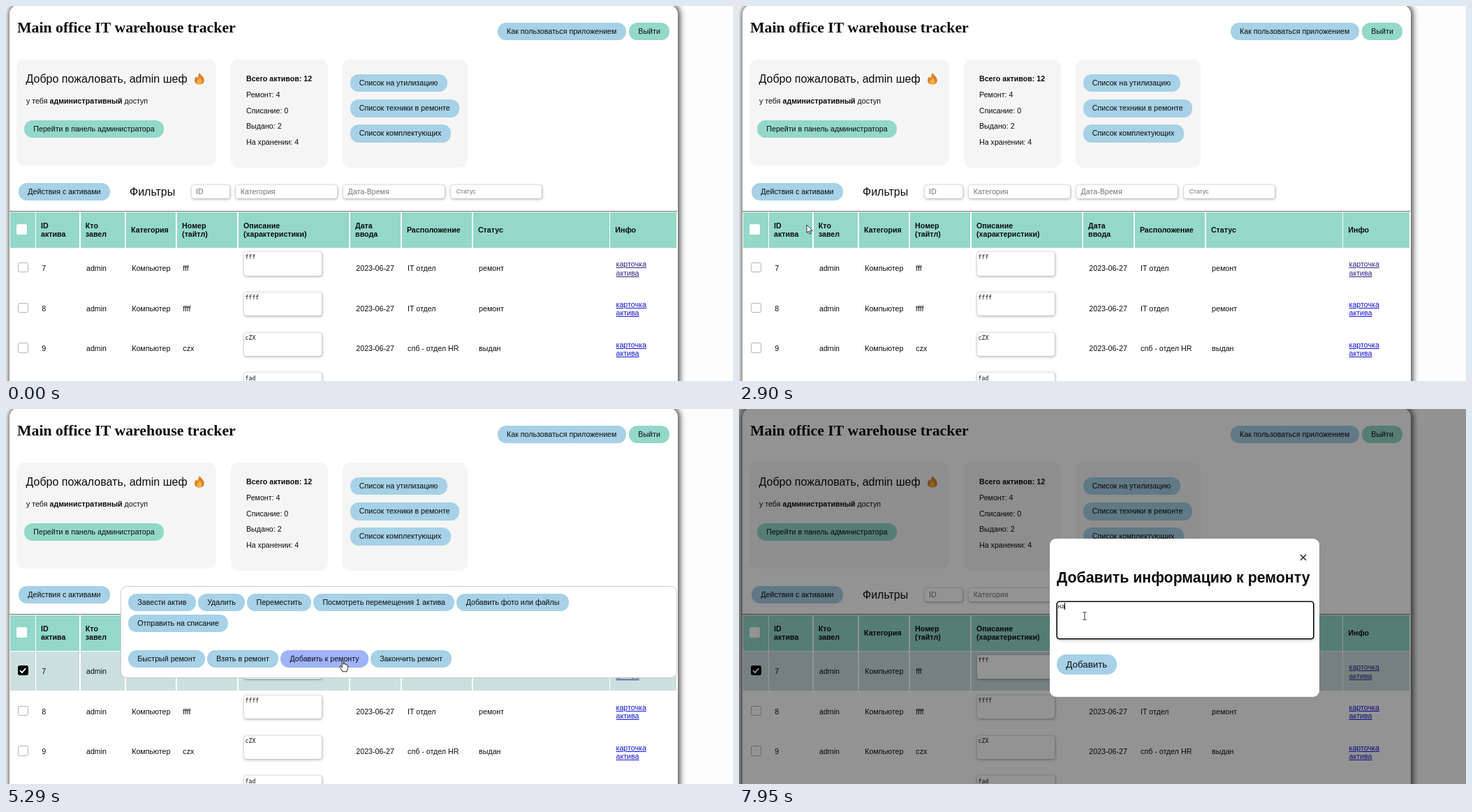
An HTML page for the animation above (8000 ms loop, 1041x538 px).

```html
<!DOCTYPE html>
<html lang="ru">
<head>
<meta charset="utf-8">
<title>Warehouse tracker</title>
<style>
  html, body { margin: 0; width: 100%; height: 100%; overflow: hidden; background: #fdfdfd; }
  #stage { position: absolute; left: 0; top: 0; width: 1041px; height: 538px; overflow: hidden;
    font: 10.67px "Liberation Sans", Arial, sans-serif; color: #0c0c0c; }
  #stage div, #stage svg { position: absolute; box-sizing: border-box; white-space: pre; }
  .t { line-height: 20px; }
  .big { font-size: 16px; }
  .bold { font-weight: bold; }
  .title { font: bold 21.8px/20px "Liberation Serif", serif; }
  .head { font-size: 21.33px; font-weight: bold; }
  .mono { font: 8.13px/20px "DejaVu Sans Mono", monospace; }
  .ph { color: #757575; }
  .small { font-size: 8.89px; }
  .link { color: #1414d8; text-decoration: underline; }
  .seen { color: #2b2a86; }
  .b { height: 25.4px; line-height: 25.4px; padding: 0 13.33px; border-radius: 12px; background: #a6d1e6; }
  .green { background: #93d8c8; }
  .wide { height: 29px; line-height: 29px; font-size: 13.33px; border-radius: 14px; }
  #stage .hot { background: #9fb2fa; }
  .page { background: #fff; border-radius: 14px; box-shadow: 1px 0 9px 2px rgba(0,0,0,.72); }
  .card { background: #f5f5f5; border-radius: 11px; }
  .field { background: #fff; border-radius: 3px; box-shadow: 0 0 1px rgba(0,0,0,.3), .5px 1px 4px rgba(0,0,0,.35); }
  .check { background: #fff; border: 1px solid #b4b4b4; border-radius: 2.5px; }
  .check svg { left: -1px; top: -1px; visibility: hidden; }
  .on .check { background: #000; border-color: #000; }
  .on .check svg { visibility: visible; }
  .row { left: 0; width: 960px; height: 57.7px; }
  .cell { background: transparent; }
  .hover .cell { background: #dde1e2; }
  .on .cell { background: #cbdfde; }
  .sel { background: #2a7fe0; color: #fff; }
  #tip { left: 626px; top: 346px; width: 162px; height: 20px; background: #f4f4f4;
    box-shadow: 0 0 1px #888, 0 1px 4px rgba(0,0,0,.4); font-size: 8.6px; }
  #tip .line { background: #cfcfcf; }
  #panel { left: 164px; top: 253.5px; width: 797px; height: 132.5px; background: #fff;
    border: 1px solid #ccc; border-radius: 9px; }
  #panel .line { left: 10px; display: flex; gap: 3px; }
  #panel .b { position: static; }
  #shade { left: 0; top: 0; width: 1041px; height: 538px; background: rgba(0,0,0,.425); }
  #modal { left: 444.5px; top: 186px; width: 386px; height: 226.5px; background: #fff; border-radius: 9px; }
  #note.focus { box-shadow: 0 0 0 1.6px #0c0c0c, .5px 2px 5px rgba(0,0,0,.35); }
  #caret { background: #000; }
</style>
</head>
<body>
<div id="stage"></div>
<script>
const LOOP = 8000, STEP = 72;
const stage = document.getElementById('stage');

const txt = (x, y, s, c = '') => `<div class="t ${c}" style="left:${x}px;top:${y - 10}px">${s}</div>`;
const btn = (x, y, s, c = '', id = '') => `<div class="b ${c}" id="${id}" style="left:${x}px;top:${y}px">${s}</div>`;
const box = (x, y, w, h, c, s = '', id = '') =>
  `<div class="${c}" id="${id}" style="left:${x}px;top:${y}px;width:${w}px;height:${h}px">${s}</div>`;
const lines = (x, y, s, c) => {
  const parts = s.split('|');
  return parts.map((p, i) => txt(x, y + (i - (parts.length - 1) / 2) * 12.3, p, c)).join('');
};

// Table geometry: left edge of each column, then the right edge of the table
const cols = [6, 42.8, 106.5, 171.7, 244.8, 332.7, 492.8, 566.6, 668.6, 865, 961.2];
const cells = (y, h, c) => cols.slice(0, -1).map((x, i) => box(x, y, cols[i + 1] - x - 1.3, h, c)).join('');
const heads = ['', 'ID|актива', 'Кто|завел', 'Категория', 'Номер|(тайтл)', 'Описание|(характеристики)',
  'Дата|ввода', 'Расположение', 'Статус', 'Инфо'];
const tick = '<svg width="14" height="14"><path d="M3 7.2 6 10.2 11.2 4.2" fill="none" stroke="#fff" stroke-width="1.8"/></svg>';
const rowTop = i => 347.9 + i * 57.7;

function row(i, id, name, note, place, state, seen = '') {
  const vals = ['', id, 'admin', 'Компьютер', name, '', '2023-06-27', place, state];
  return `<div class="row" id="row${i}" style="top:${rowTop(i)}px">` + cells(0, 56.5, 'cell') +
    box(17, 20, 14.5, 14.5, 'check', tick) +
    vals.map((v, k) => v && txt(cols[k] + 8.5, 28.2, v)).join('') +
    box(341, 5.3, 110.5, 33.5, 'field') + txt(342.6, 12.6, note, 'mono') +
    lines(873.5, 28.6, 'карточка|актива', 'link ' + seen) + '</div>';
}

const panelRow = (y, items) => `<div class="line" style="top:${y}px">` +
  items.map(s => `<div class="b"${s.endsWith('к ремонту') ? ' id="addFix"' : ''}>${s}</div>`).join('') + '</div>';

const flame = `<svg style="left:269px;top:96px" width="16" height="17">
  <path d="M8 0C10 3 15 6 14.8 11 14.6 15 11.5 16.5 7.7 16.5 3.5 16.5 1 14 1 10.5 1 8 2.5 6 3.6 5 3.8 6.5 4.5 7.2 5.3 7 6.8 5 6 2.5 8 0Z" fill="#d9822b"/>
  <path d="M8 6C9.5 8.5 12 10 11.5 13 11 15.5 9.5 16 7.7 16 5.5 16 4 14.5 4.2 12.5 4.5 10.5 7.5 9.5 8 6Z" fill="#f3b13c"/></svg>`;

const pointers = `
  <svg id="arrow" width="14" height="18" overflow="visible"><path d="M0 0V11.4L2.7 9 4.4 13 6.2 12.2 4.5 8.3H8.2Z" fill="#fff" stroke="#1b1b2b" stroke-width=".9"/></svg>
  <svg id="hand" width="14" height="18" overflow="visible"><path d="M-1 1C-1-.3 1-.3 1 1V5.6C2-.2 3.2 5 3.4 6 4.2 5 5.4 5.4 5.5 6.6 6.5 5.8 7.4 6.6 7.4 7.8V11C7.4 13 6 13.5 6 16H-.4C-.6 13.6-3 12-4.3 9.4-4.6 8-3.2 7.6-2.4 8.6L-1 10Z" fill="#fff" stroke="#111" stroke-width=".9"/></svg>
  <svg id="beam" width="14" height="18" overflow="visible"><path d="M-2.6-5.5H-.7L0-5 .7-5.5H2.6M0-5V5M-2.6 5.5H-.7L0 5 .7 5.5H2.6" fill="none" stroke="#333" stroke-width="1"/></svg>`;

stage.innerHTML =
  box(5, -2, 956.5, 580, 'page') +
  txt(16, 31, 'Main office IT warehouse tracker', 'title') +
  btn(703.7, 24, 'Как пользоваться приложением') + btn(892, 24, 'Выйти', 'green') +
  box(15.3, 77, 285.5, 152, 'card') + box(322.3, 77, 138.5, 155, 'card') + box(482, 77, 179, 155, 'card') +
  txt(28.5, 104.5, 'Добро пожаловать, admin шеф', 'big') + flame +
  txt(29, 136, 'у тебя <b>административный</b> доступ') +
  btn(26, 163.7, 'Перейти в панель администратора', 'green') +
  ['<b>Всего активов: 12</b>', 'Ремонт: 4', 'Списание: 0', 'Выдано: 2', 'На хранении: 4']
    .map((s, i) => txt(344, 104 + i * 22.8, s)).join('') +
  ['Список на утилизацию', 'Список техники в ремонте', 'Список комплектующих']
    .map((s, i) => btn(492.5, 98 + i * 36.2, s)).join('') +
  btn(18, 253.5, 'Действия с активами', '', 'actions') +
  txt(177, 266.5, 'Фильтры', 'big') +
  [[265.5, 54.5, 'ID'], [329.3, 144.5, 'Категория'], [483, 144.5, 'Дата-Время'], [636.7, 130, 'Статус']]
    .map(([x, w, s]) => box(x, 256.5, w, 19.5, 'field') +
      txt(x + (s === 'Статус' ? 8 : 6.5), 266.3, s, s === 'Статус' ? 'ph small' : 'ph')).join('') +
  '<div style="left:5px;top:293.7px;width:956px;height:1.2px;background:#666"></div>' +
  cells(296, 50.8, 'green') + heads.map((s, i) => s && lines(cols[i] + 7.3, 321, s, 'bold')).join('') +
  '<div style="left:15px;top:313px;width:15px;height:15px;background:#fff;border-radius:2.5px"></div>' +
  row(0, 7, 'fff', 'fff', 'IT отдел', 'ре<span id="mark">мон</span>т', 'seen') +
  row(1, 8, 'ffff', 'ffff', 'IT отдел', 'ремонт') +
  row(2, 9, 'czx', 'cZX', 'спб - отдел HR', 'выдан') +
  row(3, '', '', 'fad', '', '') +
  '<div id="tip"><svg style="left:76px;top:19.5px" width="10" height="6"><path d="M0 0H10L5 5Z" fill="#f4f4f4"/></svg>' +
    txt(6.5, 10, 'Найти в Юмдоксе') + txt(87, 10, 'Копировать') + box(80, 0, 1, 20, 'line') + box(141, 0, 1, 20, 'line') +
    '<svg style="left:147px;top:6px" width="10" height="8"><path d="M1 2 5 6 9 2" fill="none" stroke="#333"/></svg></div>' +
  '<div id="panel">' +
    panelRow(10.3, ['Завести актив', 'Удалить', 'Переместить', 'Посмотреть перемещения 1 актива', 'Добавить фото или файлы']) +
    panelRow(40, ['Отправить на списание']) +
    panelRow(91, ['Быстрый ремонт', 'Взять в ремонт', 'Добавить к ремонту', 'Закончить ремонт']) + '</div>' +
  '<div id="shade"><div id="modal">' +
    '<svg style="left:358px;top:22px" width="10" height="10"><path d="M1 1 9 9M9 1 1 9" stroke="#111" stroke-width="1.2"/></svg>' +
    txt(10.5, 55.5, 'Добавить информацию к ремонту', 'head') +
    box(11.2, 91.3, 366, 51.5, 'field', '', 'note') +
    txt(12, 97, 'Опишите, что именно добавляется', 'mono ph') + txt(12, 97, '', 'mono') +
    box(11.8, 92.3, 1, 10, '', '', 'caret') +
    btn(10.5, 166, 'Добавить', 'wide', 'add') + '</div></div>' + pointers;

const $ = id => document.getElementById(id);
const [hint, typed] = $('modal').querySelectorAll('.mono');
const rows = [0, 1, 2].map(i => $('row' + i));
const show = (el, on) => { el.style.visibility = on ? 'visible' : 'hidden'; };
const fade = (el, v) => { el.style.opacity = v; show(el, v > 0); };
const ramp = (t, a, b) => Math.min(1, Math.max(0, (t - a) / (b - a)));
const within = (t, a, b) => t >= a && t < b;

// Pointer path: time, x, y
const path = [
  [370, 976, 514], [442, 890, 476], [658, 564, 397], [860, 640, 385], [1150, 688, 377], [1300, 708, 377],
  [1440, 700, 380], [1590, 540, 425], [1740, 390, 404], [1882, 250, 379], [2030, 180, 374],
  [2100, 172, 374], [2460, 111, 358], [2610, 111, 358], [2890, 97, 314], [2962, 96, 313], [3180, 88, 394],
  [3330, 88, 394], [3400, 87, 396], [3500, 87, 396], [3700, 87, 292], [3850, 87, 292], [3970, 87, 270],
  [4420, 87, 270], [4500, 140, 272], [4710, 266, 336], [5000, 395, 347], [5290, 490, 362],
  [6230, 490, 362], [6490, 493, 240], [6690, 495, 297]
];

function pointAt(t) {
  const k = path.findIndex(p => p[0] > t);
  if (k === 0) return path[0].slice(1);
  if (k < 0) return path[path.length - 1].slice(1);
  const [t0, x0, y0] = path[k - 1], [t1, x1, y1] = path[k], f = (t - t0) / (t1 - t0);
  return [x0 + (x1 - x0) * f, y0 + (y1 - y0) * f];
}

const start = performance.now();

function draw(now) {
  const t = Math.max(0, now - start) % LOOP;
  const q = 370 + STEP * Math.floor((t - 350) / STEP);
  const [x, y] = pointAt(q);

  const kind = within(t, 3915, 4430) || within(t, 5040, 6345) ? 'hand' : t >= 6345 ? 'beam' : 'arrow';
  for (const id of ['arrow', 'hand', 'beam']) {
    const el = $(id);
    show(el, t >= 370 && id === kind);
    el.style.transform = `translate(${x}px,${y}px)`;
  }

  rows.forEach((el, i) => el.classList.toggle('hover',
    t >= 370 && x < 960 && y >= rowTop(i) && y < rowTop(i + 1)));
  rows[0].classList.toggle('on', within(t, 1290, 2610) || t >= 3330);
  $('mark').className = within(t, 1220, 2610) ? 'sel' : '';
  show($('tip'), within(t, 1360, 2610));

  const open = ramp(q, 5560, 5920);
  fade($('panel'), ramp(q, 4190, 4710) * (1 - open));
  fade($('shade'), open);
  $('actions').classList.toggle('hot', within(t, 3915, 4430));
  $('addFix').classList.toggle('hot', within(t, 5040, 5570));
  $('add').classList.toggle('hot', within(t, 5570, 6345));

  const text = t >= 7940 ? 'на' : t >= 7845 ? 'н' : '';
  const focus = t >= 6725;
  $('note').classList.toggle('focus', focus);
  typed.textContent = text;
  hint.style.display = text ? 'none' : '';
  $('caret').style.display = focus && !within(t, 7240, 7750) ? '' : 'none';
  $('caret').style.left = 11.8 + text.length * 4.9 + 'px';

  requestAnimationFrame(draw);
}
draw(start);
</script>
</body>
</html>
```
